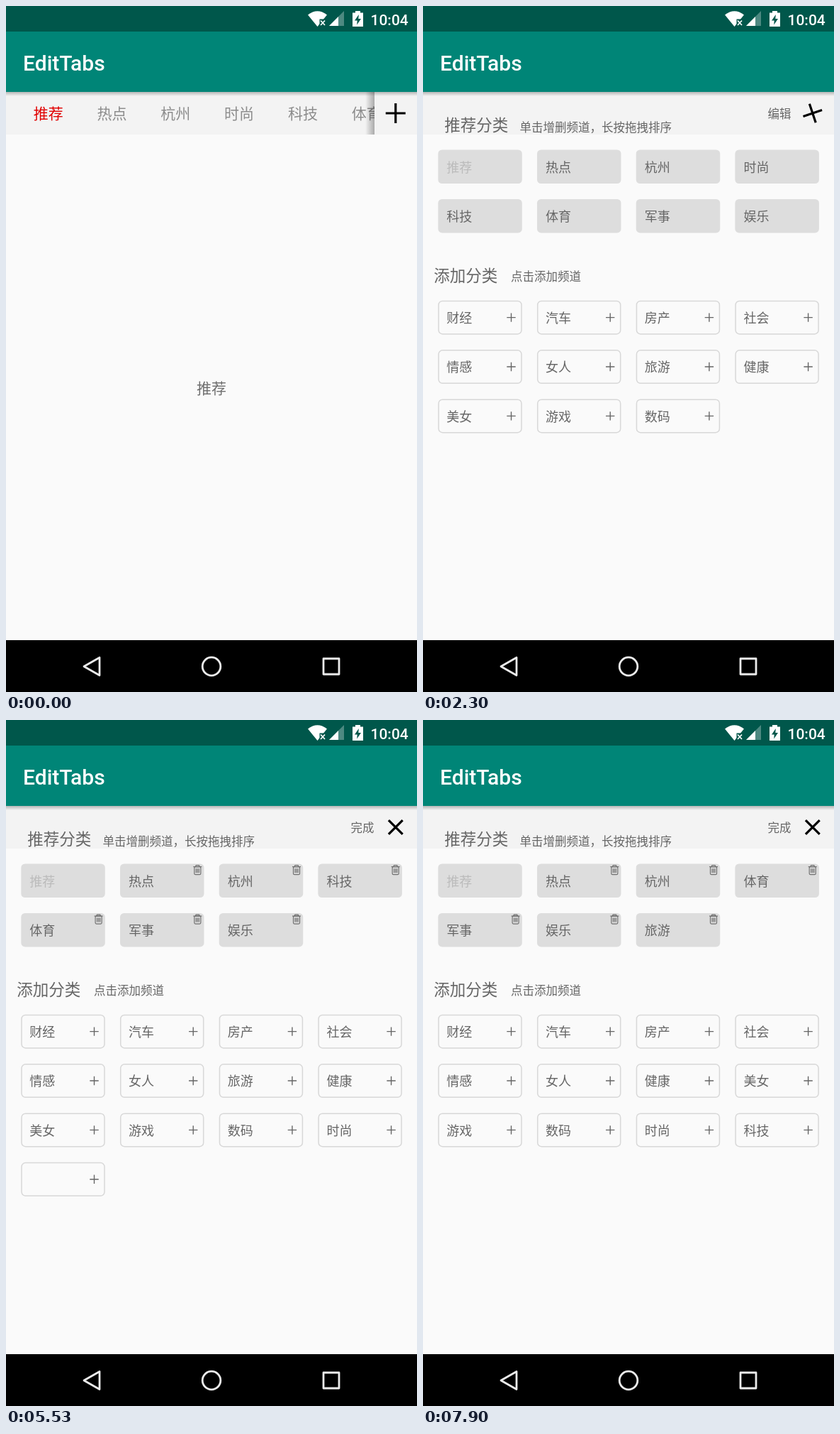
These frames come from a looping animation (580x966 px, 8000 ms). An HTML page with a canvas:

```html
<!DOCTYPE html>
<html lang="zh-CN">
<head>
<meta charset="utf-8">
<title>EditTabs</title>
<style>
  html, body { margin: 0; width: 100%; height: 100%; overflow: hidden; background: #fafafa; }
  canvas { display: block; }
</style>
</head>
<body>
<canvas id="stage" width="580" height="966"></canvas>
<script>
const ctx = document.getElementById('stage').getContext('2d');
const LOOP = 8000;
const SWIPE = [1140, 1600], PANEL_OPEN = 2300, EDIT_ON = 3500;
const FLY_DELAY = 60, FLY_TIME = 400, FLY_END = 500;
const CJK = '"Noto Sans CJK SC", "Noto Sans CJK", sans-serif';
const GREY = '#666', STRIP = '#f3f3f3', PAGE = '#fafafa';

const MINE = '推荐 热点 杭州 时尚 科技 体育 军事 娱乐'.split(' ');
const OTHERS = '财经 汽车 房产 社会 情感 女人 旅游 健康 美女 游戏 数码'.split(' ');
const MOVES = [
  { at: 4330, name: '时尚', add: false },
  { at: 5530, name: '科技', add: false },
  { at: 6930, name: '旅游', add: true }
];

const clamp = p => Math.min(1, Math.max(0, p));
const easeInOut = p => (1 - Math.cos(Math.PI * clamp(p))) / 2;
const easeOut = p => 1 - (1 - clamp(p)) ** 3;

function rect(x, y, w, h, color) {
  ctx.fillStyle = color;
  ctx.fillRect(x, y, w, h);
}

function gradientRect(x, y, w, h, dx, dy, from, to) {
  const g = ctx.createLinearGradient(x, y, x + dx, y + dy);
  g.addColorStop(0, from);
  g.addColorStop(1, to);
  rect(x, y, w, h, g);
}

function lines(color, width, ...segments) {
  ctx.strokeStyle = color;
  ctx.lineWidth = width;
  ctx.beginPath();
  for (const [x1, y1, x2, y2] of segments) {
    ctx.moveTo(x1, y1);
    ctx.lineTo(x2, y2);
  }
  ctx.stroke();
}

function polygon(color, ...points) {
  ctx.fillStyle = color;
  ctx.beginPath();
  points.forEach(p => ctx.lineTo(...p));
  ctx.closePath();
  ctx.fill();
}

// Chinese text, placed by left edge and vertical centre
function label(text, x, centerY, size, color) {
  ctx.font = `${size}px ${CJK}`;
  ctx.fillStyle = color;
  ctx.fillText(text, x, centerY + size * 0.38);
}

function latin(text, x, baseline, size) {
  ctx.font = `500 ${size}px Roboto, sans-serif`;
  ctx.fillStyle = '#fff';
  ctx.fillText(text, x, baseline);
}

function statusBar() {
  const dark = '#00574b';
  rect(0, 0, 580, 36, dark);
  ctx.fillStyle = '#fff';
  ctx.beginPath();
  ctx.moveTo(439.5, 29);
  ctx.lineTo(426, 12.5);
  ctx.quadraticCurveTo(439.5, 2, 453, 12.5);
  ctx.closePath();
  ctx.fill();
  rect(442.5, 18.5, 10, 11, dark);
  lines('#fff', 1.7, [444, 20.5, 450, 27], [450, 20.5, 444, 27]);

  polygon('rgba(255,255,255,.3)', [456, 28], [477, 28], [477, 7]);
  polygon('#fff', [456, 28], [469, 28], [469, 15]);

  rect(489, 9.5, 15, 19.5, '#fff');
  rect(493, 7, 7, 3, '#fff');
  polygon(dark, [497.8, 12], [492, 20.5], [495.7, 20.5], [495.2, 26.5], [501, 18], [497.3, 18]);
  latin('10:04', 514.5, 26.5, 21);
}

function toolbar() {
  rect(0, 36, 580, 85, '#008577');
  latin('EditTabs', 24, 90.5, 30);
  gradientRect(0, 121, 580, 6, 0, 6, 'rgba(0,0,0,.25)', 'rgba(0,0,0,0)');
}

function navBar() {
  const c = '#ececec';
  rect(0, 893, 580, 73, '#000');
  ctx.strokeStyle = c;
  ctx.lineWidth = 2.8;
  ctx.lineJoin = 'round';
  ctx.beginPath();
  ctx.moveTo(110, 930);
  ctx.lineTo(132, 917.5);
  ctx.lineTo(132, 942.5);
  ctx.closePath();
  ctx.stroke();
  ctx.beginPath();
  ctx.arc(290, 930, 12.8, 0, 7);
  ctx.stroke();
  ctx.strokeRect(448, 919, 22, 22);
}

function crossButton(degrees) {
  ctx.save();
  ctx.translate(549.8, 151);
  ctx.rotate(degrees * Math.PI / 180);
  lines('#000', 3.2, [-14, 0, 14, 0], [0, -14, 0, 14]);
  ctx.restore();
}

function tabsPage(t) {
  const page = easeOut((t - SWIPE[0]) / (SWIPE[1] - SWIPE[0]));
  const selected = Math.round(page);
  MINE.forEach((name, i) =>
    label(name, 38.7 + 89.8 * i, 151.3, 21, i === selected ? '#e10000' : '#8c8c8c'));
  gradientRect(507, 121, 13, 60, 13, 0, 'rgba(0,0,0,0)', 'rgba(0,0,0,.3)');
  rect(520, 121, 60, 60, STRIP);
  for (const i of [0, 1]) label(MINE[i], 269 + 580 * (i - page), 538, 21, '#6e6e6e');
  crossButton(0);
}

function slot(index, top) {
  return { x: 21.3 + 139.7 * (index % 4), y: top + 69.4 * Math.floor(index / 4) };
}
const mineSlot = i => slot(i, 202.5);
const otherSlot = i => slot(i, 415);

function trash(x, y) {
  lines('#707070', 1.2,
    [x - 6, y - 4.5, x + 6, y - 4.5], [x - 2.5, y - 6.5, x + 2.5, y - 6.5],
    [x - 2.5, y - 6.5, x - 2.5, y - 4.5], [x + 2.5, y - 6.5, x + 2.5, y - 4.5],
    [x - 2, y - 2, x - 2, y + 4], [x, y - 2, x, y + 4], [x + 2, y - 2, x + 2, y + 4]);
  ctx.beginPath();
  ctx.roundRect(x - 4.5, y - 4.5, 9, 11, 1.5);
  ctx.stroke();
}

function mineCell({ x, y }, name, editing) {
  const fixed = name === MINE[0];
  ctx.fillStyle = '#ddd';
  ctx.beginPath();
  ctx.roundRect(x, y, 118.5, 47.5, 5.5);
  ctx.fill();
  label(name, x + 12, y + 24.5, 18, fixed ? '#bbb' : GREY);
  if (editing && !fixed) trash(x + 109.3, y + 8.7);
}

function otherCell({ x, y }, name) {
  ctx.strokeStyle = '#d8d8d8';
  ctx.lineWidth = 1.5;
  ctx.beginPath();
  ctx.roundRect(x + 0.7, y + 0.4, 117, 46.5, 5.5);
  ctx.stroke();
  label(name, x + 12, y + 24, 18, GREY);
  lines(GREY, 1.4, [x + 97, y + 23.6, x + 109.4, y + 23.6], [x + 103.2, y + 17.4, x + 103.2, y + 29.8]);
}

function panel(t) {
  const editing = t >= EDIT_ON;
  label('推荐分类', 30.3, 167, 22.5, GREY);
  label('单击增删频道，长按拖拽排序', 136.5, 171, 16.5, GREY);
  label(editing ? '完成' : '编辑', 486.5, 152, 16.5, GREY);
  label('添加分类', 15.3, 379, 22.5, GREY);
  label('点击添加频道', 124, 380.7, 16.5, GREY);
  crossButton(-45 * easeInOut((t - 2120) / 410));

  const mine = [...MINE], others = [...OTHERS];
  let flight = null;
  for (const { at, name, add } of MOVES) {
    if (t < at) break;
    const [from, to] = add ? [others, mine] : [mine, others];
    const index = from.indexOf(name), elapsed = t - at;
    if (elapsed >= FLY_END) {
      from.splice(index, 1);
      to.push(name);
      continue;
    }
    // The new place stays blank until the flying copy has landed
    to.push('');
    if (elapsed < FLY_DELAY) continue;
    from[index] = '';
    const [start, end] = add
      ? [otherSlot(index), mineSlot(mine.length - 1)]
      : [mineSlot(index), otherSlot(others.length - 1)];
    const p = easeInOut((elapsed - FLY_DELAY) / FLY_TIME);
    const pos = { x: start.x + (end.x - start.x) * p, y: start.y + (end.y - start.y) * p };
    flight = () => add ? otherCell(pos, name) : mineCell(pos, name, true);
  }
  mine.forEach((name, i) => mineCell(mineSlot(i), name, editing));
  others.forEach((name, i) => otherCell(otherSlot(i), name));
  if (flight) flight();
}

function draw(now) {
  const t = now % LOOP;
  rect(0, 0, 580, 966, PAGE);
  rect(0, 121, 580, 60, STRIP);
  (t < PANEL_OPEN ? tabsPage : panel)(t);
  statusBar();
  toolbar();
  navBar();
}

function tick() {
  draw(performance.now());
  requestAnimationFrame(tick);
}
tick();
</script>
</body>
</html>
```
